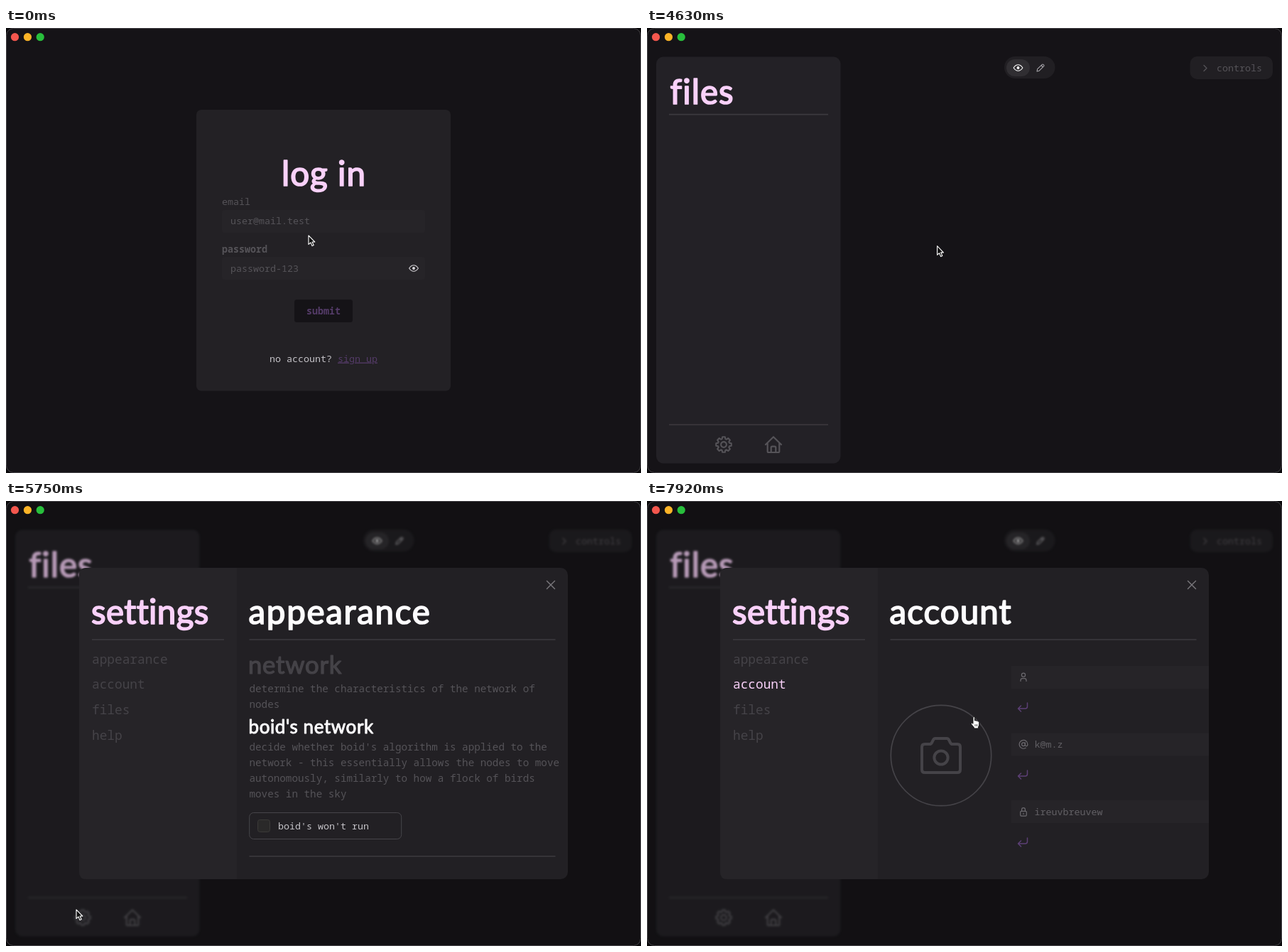
These frames come from a looping animation (894x626 px, 8000 ms). An HTML page:

```html
<!DOCTYPE html>
<html lang="en">
<head>
<meta charset="utf-8">
<title>log in</title>
<style>
  html, body { margin: 0; width: 100%; height: 100%; overflow: hidden; background: #0a090b; }
  svg { display: block; width: 894px; height: 626px; }
  text { font: 400 13.333px "Noto Sans Mono", "DejaVu Sans Mono", monospace; fill: currentColor; white-space: pre; }
  .big {
    font: 400 47.5px Lato, "Open Sans", sans-serif; letter-spacing: .022em; font-variant-ligatures: none;
    stroke: currentColor; stroke-width: .036em; stroke-linejoin: round;
  }
  .tight { letter-spacing: .008em; }
  .wide { letter-spacing: .036em; }
  .mid { font-size: 34.7px; }
  .sub { font-size: 26px; }
  .item { font-size: 17.8px; }
  .para { font-size: 14.28px; }
  .bold { font-weight: 700; }
  .semi { font-weight: 600; }
  .line { stroke: #3c3a3f; stroke-width: 1.6; }
  .icon { fill: none; stroke: currentColor; stroke-linecap: round; stroke-linejoin: round; }
  .pink { color: #f9d1f9; }
  .item.pink { font-weight: 500; }
  .white { color: #fdfcfe; }
  .soft { color: #c4c2c7; }
  .grey { color: #555358; }
  .dim { color: #454348; }
  .plum { color: #543b68; }
</style>
</head>
<body>
<svg viewBox="0 0 894 626">
  <defs>
    <g id="eye" class="icon" stroke-width="1.1">
      <path d="M-6.4 0Q-3.6-4.2 0-4.2T6.4 0Q3.6 4.2 0 4.2T-6.4 0Z"/>
      <circle r="1.4" fill="currentColor"/>
    </g>
    <g id="enter" class="icon" stroke-width="1.5">
      <path d="M6.5-6V-1Q6.5 2 3.5 2H-6.5M-2.5-2L-6.5 2L-2.5 6"/>
    </g>
  </defs>

  <rect x=".5" y=".5" width="893" height="625" rx="10" fill="#151317"/>

  <g id="login">
    <rect x="268" y="115" width="358" height="395.5" rx="7" fill="#232125"/>
    <text class="big pink" x="447.5" y="221.5" text-anchor="middle">log in</text>
    <text class="grey" x="304" y="249">email</text>
    <text class="grey semi" x="304" y="315.5">password</text>
    <rect x="304" y="256" width="286" height="32" rx="4" fill="#262428"/>
    <rect x="304" y="322" width="286" height="32" rx="4" fill="#262428"/>
    <text class="grey" id="mailHint" x="316" y="276">user@mail.test</text>
    <text class="pink" id="mail" x="316" y="276"></text>
    <text class="grey" id="passHint" x="316" y="342.5">password-123</text>
    <g id="dots" fill="#f9d1f9"></g>
    <rect id="caret" width="1.3" height="18" fill="#e2c4e4"/>
    <use href="#eye" x="574" y="338" color="#d8d6da"/>
    <rect x="406" y="382" width="82" height="32" rx="3.5" fill="#151317"/>
    <text class="plum bold" x="447" y="402.5" text-anchor="middle">submit</text>
    <text class="soft" x="371" y="469.5">no account?</text>
    <text class="plum" x="467" y="469.5" text-decoration="underline">sign up</text>
  </g>

  <g id="files">
    <rect x="13" y="40.5" width="259.5" height="572" rx="10" fill="#232126"/>
    <text class="big pink" x="32.5" y="107">files</text>
    <path class="line" d="M31 121.6H255M31 558H255"/>
    <g id="gear" class="icon grey" stroke-width="2.1" transform="translate(108 586)">
      <path id="teeth"/>
      <circle r="3.9"/>
    </g>
    <g class="icon grey" stroke-width="2.2" transform="translate(178 586)">
      <path d="M-11 0L0-10.8L11 0M-8.3-2.5V9.5Q-8.3 11 -6.8 11H6.8Q8.3 11 8.3 9.5V-2.5M-3.3 11V4.2Q-3.3 2.7-1.8 2.7H1.8Q3.3 2.7 3.3 4.2V11"/>
    </g>
    <rect x="503" y="40" width="71.5" height="31" rx="15.5" fill="#211f23"/>
    <rect x="506" y="44" width="33" height="24" rx="12" fill="#302e32"/>
    <use href="#eye" x="522.5" y="56" color="#fff"/>
    <path class="icon" color="#a5a3a8" stroke-width="1.1" transform="translate(554 56)"
      d="M-5 5L-4.3 1.7L2.3-4.7Q3.1-5.4 3.9-4.7L4.7-3.9Q5.4-3.1 4.7-2.3L-1.8 4.2ZM1-3.5L3.5-1"/>
    <rect x="764.5" y="40" width="116.5" height="32" rx="10" fill="#211f23"/>
    <path class="icon grey" stroke-width="1.3" d="M784 52.5L788 56.5L784 60.5"/>
    <text class="grey" x="802" y="61">controls</text>
  </g>

  <rect id="shade" x="1" y="1" width="892" height="624" rx="9.5" fill="#0c0c0d"/>

  <g id="modal">
    <rect x="103" y="94" width="688" height="438" rx="10" fill="#222024"/>
    <path d="M325 94H113Q103 94 103 104V522Q103 532 113 532H325Z" fill="#262428"/>
    <text class="big tight pink" x="120" y="172.5">settings</text>
    <path class="line" d="M121 195H307M342.5 195H773.5"/>
    <g id="menu"></g>
    <path class="icon" color="#79777c" stroke-width="1.4" d="M761.5 112.5L772.5 123.5M772.5 112.5L761.5 123.5"/>

    <g id="appearance">
      <text class="big wide white" x="341.5" y="172.5">appearance</text>
      <text class="big mid dim" x="341" y="242.5">network</text>
      <g class="grey" id="copy"></g>
      <text class="big sub white" x="341.5" y="326.5">boid's network</text>
      <rect x="342.7" y="438.5" width="214" height="37" rx="6" fill="none" stroke="#47454a"/>
      <rect x="354.5" y="448.5" width="17" height="17" rx="3" fill="#2a2929" stroke="#3b3a38"/>
      <text class="soft" x="383" y="461.5">boid's won't run</text>
      <path class="line" d="M342.5 499.7H773.5"/>
    </g>

    <g id="account">
      <text class="big white" x="341.5" y="172.5">account</text>
      <circle class="icon dim" stroke-width="1.7" cx="414" cy="358" r="70.7"/>
      <g class="icon dim" stroke-width="4" transform="translate(414 358)">
        <path d="M-27-12Q-27-16-23-16H-16Q-14-16-13-18L-11-22Q-10-24-8-24H8Q10-24 11-22L13-18Q14-16 16-16H23Q27-16 27-12V20Q27 24 23 24H-23Q-27 24-27 20Z"/>
        <circle cy="3" r="9.6"/>
      </g>
      <g fill="#262428">
        <rect x="513" y="232" width="278" height="32"/>
        <rect x="513" y="326.5" width="278" height="32"/>
        <rect x="513" y="421" width="278" height="32"/>
      </g>
      <g class="icon" color="#6c6a6f" stroke-width="1.2">
        <circle cx="530" cy="244.8" r="2.6"/>
        <path d="M526 253.5V252.3Q526 249.7 528.6 249.7H531.4Q534 249.7 534 252.3V253.5"/>
        <circle cx="530" cy="342.3" r="2.4"/>
        <path d="M532.4 339.9V343Q532.4 344.8 534 344.8Q535.9 344.8 535.9 342.3A5.9 5.9 0 1 0 533.2 347.3"/>
        <rect x="525.7" y="436.3" width="8.6" height="6.8" rx="1.3"/>
        <path d="M527.6 436V434A2.4 2.4 0 0 1 532.4 434V436M530 439.2V440.4"/>
      </g>
      <g color="#626065">
        <text x="545.5" y="347">k@m.z</text>
        <text x="545.5" y="441.5">ireuvbreuvew</text>
      </g>
      <g color="#5c3f75">
        <use href="#enter" x="529" y="290"/>
        <use href="#enter" x="529" y="385"/>
        <use href="#enter" x="529" y="480"/>
      </g>
    </g>
  </g>

  <rect x=".5" y=".5" width="893" height="625" rx="10" fill="none" stroke="#48464a"/>
  <circle cx="12.5" cy="12.7" r="5.6" fill="#f4574e"/>
  <circle cx="30.4" cy="12.7" r="5.6" fill="#fcb427"/>
  <circle cx="48.2" cy="12.7" r="5.6" fill="#28bf3c"/>

  <g id="cursor">
    <path id="arrow" d="M1 .8V13.4L3.9 10.8L6 15.6L8.2 14.6L6.1 10H9.8Z" fill="#111" stroke="#fff" stroke-width="1.1" stroke-linejoin="round"/>
    <path id="hand" d="M3 1.2Q3 0 4.2 0T5.4 1.2V5.4Q6.4 4.8 7.4 5.8Q8.6 5.2 9.5 6.3Q11.6 6 11.6 8V11Q11.6 13 10.4 14.4V16.4H4.4V15L.6 10.5Q-.2 9.4 .6 8.8Q1.4 8.2 3 9.8Z" fill="#fff" stroke="#111" stroke-width=".9" stroke-linejoin="round"/>
    <path id="fingers" d="M5.8 10.5V13.5M7.5 10.5V13.5M9.2 10.5V13.5" stroke="#222" stroke-width=".6"/>
  </g>
</svg>

<script>
const LOOP = 8000, NS = "http://www.w3.org/2000/svg";
const $ = id => document.getElementById(id);
const show = (id, on) => { $(id).style.display = on ? "" : "none"; };
const ramp = (t, a, b) => Math.min(1, Math.max(0, (t - a) / (b - a)));
const at = (steps, t) => steps.filter(s => s[0] <= t).pop()[1];

function add(parent, tag, attrs, text = "") {
  const el = document.createElementNS(NS, tag);
  for (const k in attrs) el.setAttribute(k, attrs[k]);
  el.textContent = text;
  return $(parent).appendChild(el);
}

const dots = Array.from({ length: 12 }, (_, i) =>
  add("dots", "circle", { cx: 320 + 8 * i, cy: 338, r: 1.8 }));

const ROW = 35.7;
const items = ["appearance", "account", "files", "help"].map((name, i) =>
  add("menu", "text", { x: 121, y: 228.5 + ROW * i, class: "item" }, name));

[[269, "determine the characteristics of the network of"],
 [291, "nodes"],
 [351, "decide whether boid's algorithm is applied to the"],
 [373, "network - this essentially allows the nodes to move"],
 [395, "autonomously, similarly to how a flock of birds"],
 [417, "moves in the sky"]
].forEach(([y, s]) => add("copy", "text", { x: 342.5, y, class: "para" }, s));

// Eight gear teeth, four corners each
const teeth = [];
for (let i = 0; i < 8; i++)
  for (const [r, d] of [[8.3, -.29], [10.9, -.17], [10.9, .17], [8.3, .29]]) {
    const a = i * Math.PI / 4 + d;
    teeth.push((r * Math.cos(a)).toFixed(2) + " " + (r * Math.sin(a)).toFixed(2));
  }
$("teeth").setAttribute("d", "M" + teeth.join("L") + "Z");

const MAIL = [[0, ""], [250, "k"], [1170, "k@"], [2130, "k@m"], [2290, "k@m."], [2460, "k@m.z"]];
const PASS = [[0, 0], [3080, 3], [3120, 6], [3170, 9], [3210, 12]];
const CARET = [[0, 0], [250, 1], [750, 0], [1170, 1], [1750, .75], [1830, 0], [2130, 1],
               [2670, 0], [2710, 1], [3580, .75], [3630, .4], [3750, 0]];
// time, x, y
const PATH = [[0, 425, 291], [4580, 425, 291], [4800, 350, 355], [5050, 185, 505], [5250, 98.5, 572],
              [5380, 98, 574], [5790, 98, 574], [6000, 115, 500], [6200, 150, 375], [6380, 180, 299],
              [6710, 188.5, 284], [6860, 187, 281], [7080, 182, 257], [7400, 182, 257],
              [7530, 215, 264], [7760, 380, 292], [7900, 456, 303.5], [8000, 456, 303.5]];

function place(t) {
  const i = Math.max(1, PATH.findIndex(p => p[0] > t));
  const [a, x, y] = PATH[i - 1], [b, u, v] = PATH[i];
  const k = ramp(t, a, b);
  return [x + (u - x) * k, y + (v - y) * k];
}

function draw(t) {
  const enter = ramp(t, 3970, 4130), open = ramp(t, 5550, 5710), [x, y] = place(t);

  $("login").style.opacity = 1 - enter;
  $("files").style.opacity = enter;
  show("login", enter < 1);
  show("files", enter > 0);

  const mail = at(MAIL, t), count = at(PASS, t), inPass = t >= 2690;
  $("mail").textContent = mail;
  show("mailHint", !mail);
  show("passHint", !count);
  dots.forEach((d, i) => { d.style.display = i < count ? "" : "none"; });
  $("caret").setAttribute("x", 315.3 + 8 * (inPass ? count : mail.length));
  $("caret").setAttribute("y", inPass ? 329 : 262.5);
  $("caret").style.opacity = at(CARET, t);

  const overGear = open < .5 && Math.abs(x - 108) < 13 && Math.abs(y - 586) < 15;
  $("gear").setAttribute("class", "icon " + (overGear ? "pink" : "grey"));

  $("files").style.filter = open ? `blur(${1.5 * open}px)` : "none";
  $("shade").style.opacity = .28 * open;
  $("modal").style.opacity = open;
  show("modal", open > 0);
  const account = t >= 7290;
  show("appearance", !account);
  show("account", account);

  const row = x > 120 && x < 307 ? Math.floor((y - 204.5) / ROW) : -1;
  items.forEach((el, i) => el.setAttribute("class",
    "item " + (i === row || (account && i === 1) ? "pink" : "dim")));

  const hand = account && Math.hypot(x + 1 - 414, y - 358) < 72;
  show("cursor", t < 210 || t >= 4580);
  show("arrow", !hand);
  show("hand", hand);
  show("fingers", hand);
  $("cursor").setAttribute("transform", `translate(${x.toFixed(2)} ${y.toFixed(2)})`);
}

const start = performance.now();
function tick() {
  draw((performance.now() - start) % LOOP);
  requestAnimationFrame(tick);
}
tick();
</script>
</body>
</html>
```
